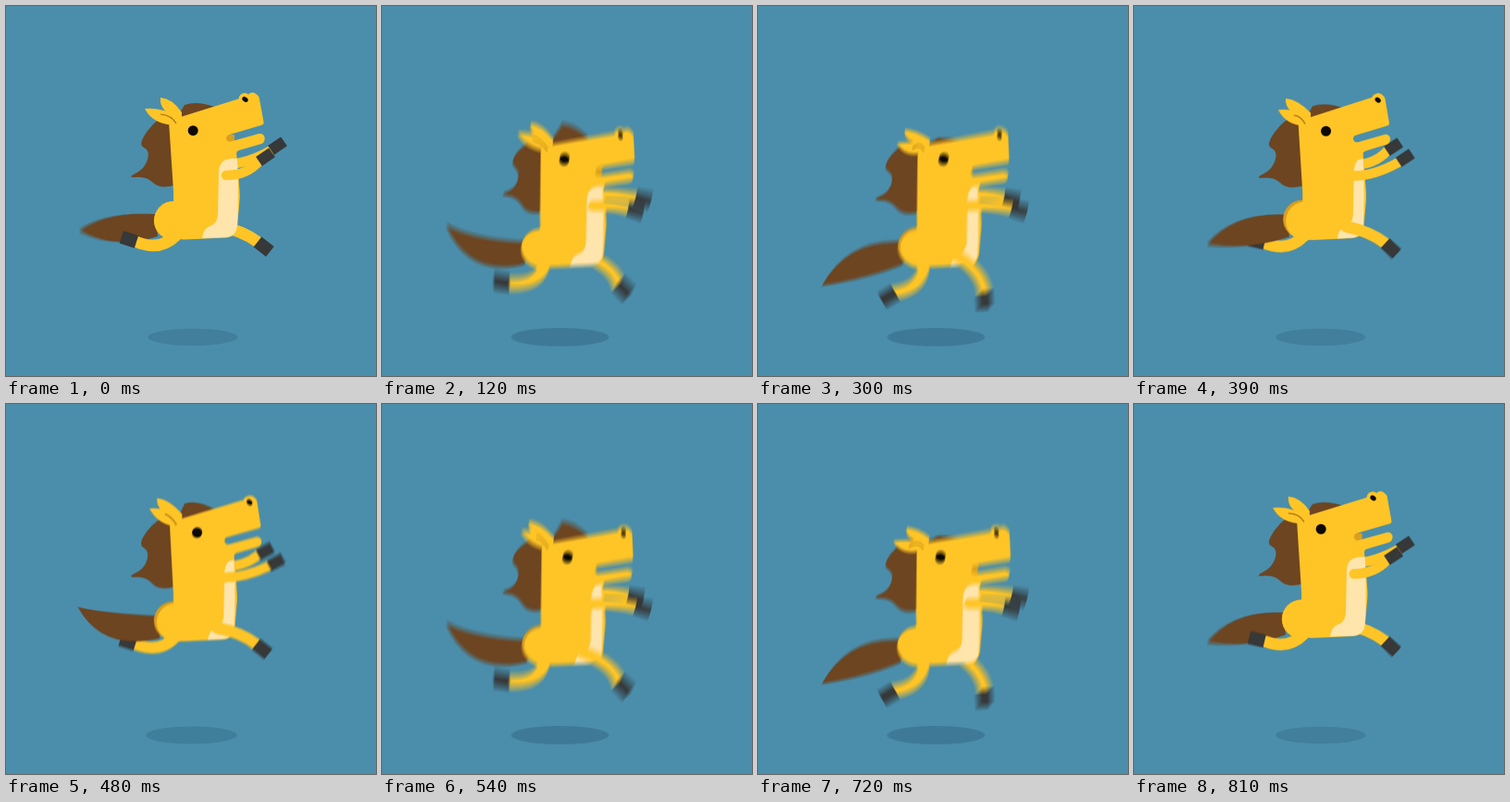
An HTML page with a canvas that plays this animation: 400x400 px, repeating every 840 ms.

```html
<!DOCTYPE html>
<html lang="en">
<head>
<meta charset="utf-8">
<title>Galloping horse</title>
<style>
  html, body { margin: 0; width: 100%; height: 100%; overflow: hidden; background: #4b8eab; }
  canvas { display: block; width: 100vw; height: 100vh; }
</style>
</head>
<body>
<canvas id="stage" width="400" height="400"></canvas>
<script>
const HOP = 420, LOOP = 840, STEP = 30, SHUTTER = 15, SAMPLES = 12;
const SKY = '#4b8eab', GOLD = '#ffc526', CREAM = '#ffe5ac', BROWN = '#6e4521',
      HOOF = '#373838', DARK = '#d99f1f', BLACK = '#0d0903';

const view = document.getElementById('stage').getContext('2d');
const layer = document.createElement('canvas');
layer.width = layer.height = 400;
const g = layer.getContext('2d');

const { PI, sin, cos } = Math;
const mod = (a, n) => ((a % n) + n) % n;
const clamp = a => Math.min(1, Math.max(0, a));

// Eased hop: fall is 0 in the air and 1 on the ground, speed is positive on the way down
function hop(t) {
  const p = mod(t, HOP) / (HOP / 2), q = p > 1 ? 2 - p : p, r = Math.min(q, 1 - q);
  return { fall: q < 0.5 ? 4 * r ** 3 : 1 - 4 * r ** 3, speed: (p > 1 ? -1 : 1) * 5.4 * r * r };
}

// [x, y, corner radius]
const BODY = [
  [176, 124, 5], [256, 99, 3], [273, 95, 4], [279, 128, 3], [238, 140, 4], [238, 148, 4],
  [281, 136, 5], [279, 148, 5], [249, 157, 3], [253, 205, 60], [249, 250, 13],
  [182, 253, 10], [181, 200, 30]
];
const MANE = [195, 112, 164, 120, 142, 150, 156, 156, 150, 176, 130, 186, 152, 184, 166, 198, 198, 190];

function fill(color, draw) {
  g.fillStyle = color;
  g.beginPath();
  draw();
  g.fill();
}
const oval = (color, [x, y], rx, ry = rx, turn = 0) =>
  fill(color, () => g.ellipse(x, y, rx, ry, turn, 0, 7));

function rounded(color, pts) {
  fill(color, () => {
    const a = pts[0], z = pts[pts.length - 1];
    g.moveTo((a[0] + z[0]) / 2, (a[1] + z[1]) / 2);
    pts.forEach(([x, y, r], i) => {
      const [nx, ny] = pts[(i + 1) % pts.length];
      g.arcTo(x, y, nx, ny, r);
    });
    g.closePath();
  });
}

// Closed curve through the midpoints of a flat point list
function soft(color, p) {
  const n = p.length;
  fill(color, () => {
    g.moveTo((p[n - 2] + p[0]) / 2, (p[n - 1] + p[1]) / 2);
    for (let i = 0; i < n; i += 2)
      g.quadraticCurveTo(p[i], p[i + 1], (p[i] + p[(i + 2) % n]) / 2, (p[i + 1] + p[(i + 3) % n]) / 2);
  });
}

// Curved limb from (ax, ay) to the heel, then a hoof pointing at the given angle
function limb(ax, ay, bx, by, hx, hy, angle, width) {
  g.lineCap = 'round';
  g.strokeStyle = GOLD;
  g.lineWidth = width;
  g.beginPath();
  g.moveTo(ax, ay);
  g.quadraticCurveTo(bx, by, hx, hy);
  g.stroke();
  g.lineCap = 'butt';
  g.strokeStyle = HOOF;
  g.lineWidth = width + 1.5;
  g.beginPath();
  g.moveTo(hx, hy);
  g.lineTo(hx + 17 * cos(angle), hy + 17 * sin(angle));
  g.stroke();
}

// Stride is 1 with the foot stretched back, -1 with it stretched forward
function leg(t, k, speed) {
  const stride = sin(PI / 2 * cos(2 * PI * t / LOOP - 0.12));
  const ax = 207 - 23 * stride, ay = 243 + 5 * stride;
  const hx = 206.5 - 65.5 * stride, hy = 255 + 20 * k - 5 * speed;
  const angle = (118 + 80 * stride * (1 - 0.5 * clamp(-speed))) * PI / 180;
  limb(ax, ay, (ax + hx) / 2 + 4 + 10 * k, (ay + hy) / 2 + 5 + 9 * stride, hx, hy, angle, 12.5);
}

function arm(y, reach, k) {
  limb(238, y + 3 * k, 260, y + 2 * k, 280 + reach, y - 15 + 21 * k, -0.6 + 0.85 * k, 10.5);
}

function ear(x, y, bx, by, up, rise, down, sag) {
  fill(GOLD, () => {
    g.moveTo(bx, by - 8);
    g.quadraticCurveTo(x + up, y + rise, x, y);
    g.quadraticCurveTo(x + down, y + sag, bx, by);
  });
}

function scene(t) {
  const { fall, speed } = hop(t), k = fall / 0.685;
  const facing = cos(2 * PI * t / LOOP), turn = (1 - facing) / 2;
  const beat = 2 * PI * t / HOP;

  // Head nods with the hop, the whole figure narrows as it turns; depth adds parallax
  const warp = ([x, y, r], depth = 0) => {
    const nod = 0.13 * k * clamp((205 - y) / 50);
    return [x - nod * (y - 165) + turn * (depth + 0.04 * (215 - x)), y + nod * (x - 195), r];
  };

  g.fillStyle = SKY;
  g.fillRect(0, 0, 400, 400);
  oval(`rgba(0,35,60,${0.135 + 0.04 * k})`, [202 - 9.5 * k, 358], 48.5 + 4 * k, 9.3 + 0.7 * k);

  g.save();
  g.translate(-14.6 * fall, 44 * fall);
  leg(t + HOP, k, speed);

  // tail
  const root = 162 + 4 * turn;
  fill(BROWN, () => {
    const tx = 79, ty = 240 + 3 * cos(beat) - 34 * sin(beat);
    g.moveTo(tx, ty);
    g.quadraticCurveTo(107, 222, root, 225);
    g.lineTo(root + 2, 249);
    g.quadraticCurveTo(117 - 14 * sin(beat), 264, tx, ty);
  });

  arm(171, 6.5 * facing, k);

  // mane flaps more towards its loose left edge
  soft(BROWN, MANE.map((v, i) => {
    const loose = clamp((172 - MANE[i - i % 2]) / 30);
    return v + loose * (i % 2 ? -9 * k - 3 * speed : 4 * k + 2 * speed);
  }));

  // forelock
  const back = warp([184, 122]), front = warp([228, 110]);
  fill(BROWN, () => {
    const px = 193 + 12 * k, py = 107 - 2 * k - 7.5 * speed;
    g.moveTo(...back);
    g.lineTo(px, py);
    g.quadraticCurveTo(px + 14, py - 5 + 6 * k, ...front);
    g.lineTo(front[0] - 4, front[1] + 8);
  });

  const [bx, by] = warp([186, 129]);
  ear(167 + 4 * k - 3 * turn, 99 + k - 3.5 * speed, bx + 4, by - 6, 13, 1, -2, 16);

  // open mouth, seen when the head faces the viewer
  const [mx, my] = warp([238, 144]);
  g.fillStyle = DARK;
  g.fillRect(mx, my - 5, 9 * (1 - turn), 9);

  oval(DARK, warp([181, 232 - 2 * turn]), 21);
  oval(GOLD, warp([181, 232], 3), 21);
  rounded(GOLD, BODY.map(p => warp(p)));
  oval(GOLD, warp([266.5, 99]), 5.5);
  oval(GOLD, warp([258, 100.5], 7), 6.5);

  // belly
  fill(CREAM, () => {
    const x = 230 + 8 * turn, right = 251 - 2 * turn - k;
    g.moveTo(right, 165);
    g.quadraticCurveTo(x + 1, 163, x, 178);
    g.lineTo(x - 1, 226);
    g.quadraticCurveTo(x - 2, 236, x - 10, 238);
    g.quadraticCurveTo(x - 17, 241, x - 18, 251);
    g.lineTo(right - 13, 250);
    g.quadraticCurveTo(right - 2, 249, right - 1, 238);
    g.quadraticCurveTo(right + 1, 205, right - 1, 165);
  });

  leg(t, k, speed);

  const ex = 150 + 5 * k + 6 * turn, ey = 111 + 1.5 * k - 5.5 * speed;
  ear(ex, ey, bx, by, 20, -2, 9, 18);
  g.strokeStyle = '#a8741c';
  g.lineWidth = 1.2;
  g.beginPath();
  g.moveTo(ex + 17, ey + 6);
  g.quadraticCurveTo(bx - 7, by - 11, bx - 2, by - 2);
  g.stroke();

  oval(BLACK, warp([202.2, 134.7], 5), 5.5);
  oval(BLACK, warp([258.5, 101], 7), 3.4, 2.5, 0.6 + 0.6 * k);
  arm(183, -6.5 * facing, k);
  g.restore();
}

// Average several instants for motion blur
function paint(now) {
  const t = mod(Math.floor(now / STEP) * STEP, LOOP);
  for (let i = 0; i < SAMPLES; i++) {
    scene(t + SHUTTER * ((i + 0.5) / SAMPLES - 0.5));
    view.globalAlpha = 1 / (i + 1);
    view.drawImage(layer, 0, 0);
  }
}

let start = null;
function tick(now) {
  if (start === null) start = now;
  paint(now - start);
  requestAnimationFrame(tick);
}
paint(0);
requestAnimationFrame(tick);
</script>
</body>
</html>
```
